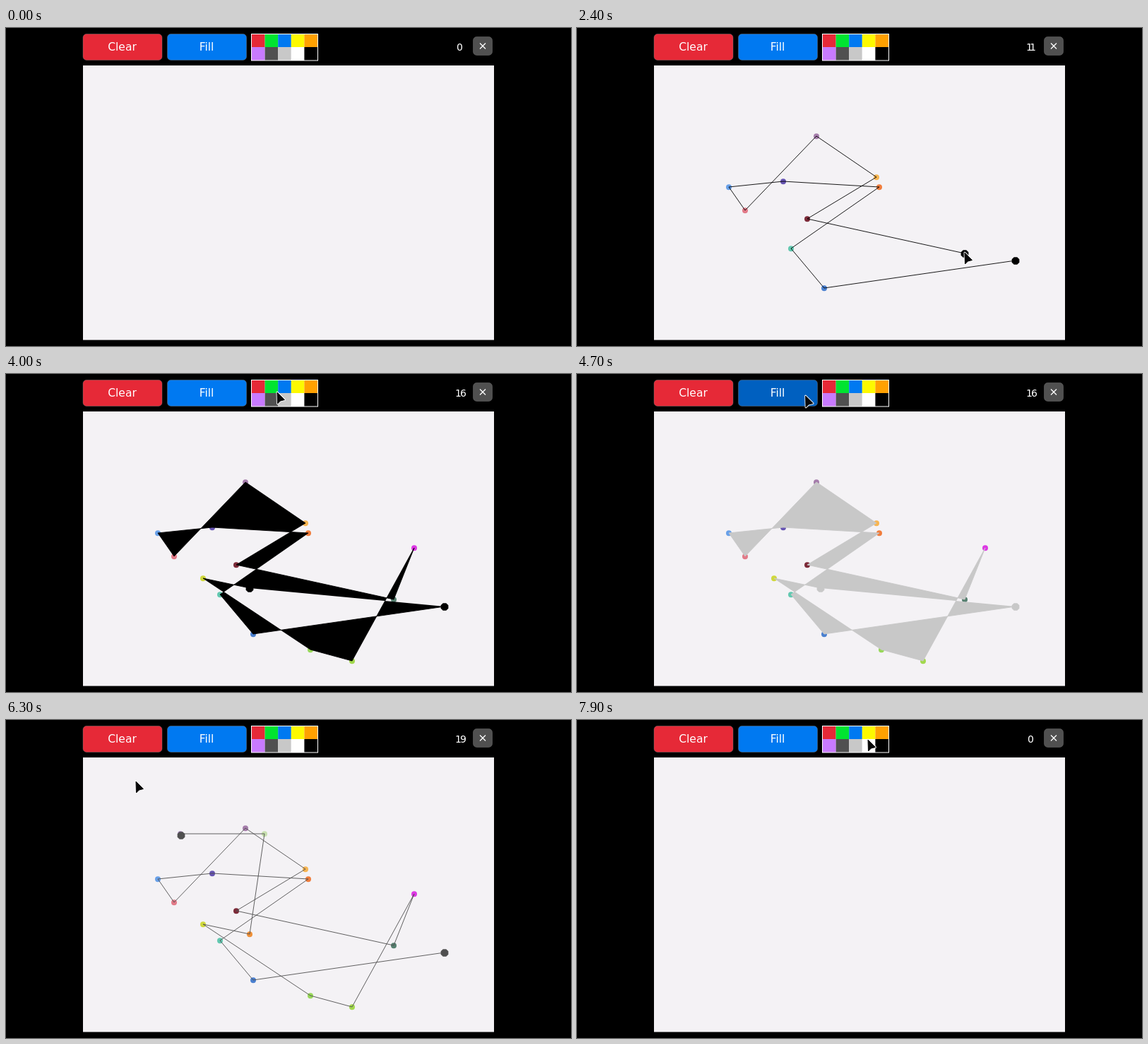
These frames come from a looping animation (800 px wide and 450 px high, 8000 ms). An HTML page with a canvas:

```html
<!DOCTYPE html>
<html lang="en">
<head>
<meta charset="utf-8">
<style>
html, body { margin: 0; width: 100%; height: 100%; overflow: hidden; background: #000; }
canvas { display: block; }
</style>
</head>
<body>
<canvas id="stage" width="800" height="450"></canvas>
<script>
const ctx = document.getElementById('stage').getContext('2d');
const LOOP = 8000, STEP = 100, CLEAR_AT = 7400;
const RED = '#e62937', BLUE = '#0079f1', DARK = '#505050', LIGHT = '#c8c8c8';
const PALETTE = [RED, '#00e430', BLUE, '#fdf900', '#ffa100', '#c87aff', DARK, LIGHT, '#fff', '#000'];

// Clicked vertices: time, x, y, colour once another vertex follows
const VERTICES = [
  [100, 621, 329, '#000'], [500, 350, 368, '#4a80d0'], [700, 303, 312, '#62c8b0'],
  [900, 428, 225, '#f07d3c'], [1100, 292, 217, '#6654b2'], [1300, 215, 225, '#68a0e8'],
  [1500, 238, 258, '#e27a88'], [1700, 339, 153, '#a57dab'], [1900, 424, 211, '#f7b552'],
  [2100, 326, 270, '#7c2a38'], [2300, 549, 319, '#568070'], [2500, 578, 246, '#dd38e4'],
  [2700, 490, 406, '#a2d84e'], [2800, 431, 390, '#98d85a'], [3000, 279, 289, '#cfd83c'],
  [3200, 345, 303, '#ee9038'], [5800, 366, 161, '#c8e0b0'], [6000, 247, 161, '#9a80b0'],
  [6100, 248, 163, '#70a098'], [6400, 179, 87, '#000']
];

// Pointer stops on the toolbar and pauses between clicks
const STOPS = [
  [200, 430, 349], [300, 430, 349], [2400, 549, 318], [3500, 292, 31], [3700, 292, 31],
  [4000, 384, 26], [4200, 391, 34], [4500, 391, 34], [4800, 300, 30], [4900, 298, 30],
  [5300, 379, 31], [5400, 377, 30], [5500, 377, 30], [6300, 184, 87], [6900, 296, 30],
  [7100, 298, 30], [7300, 170, 30], [7400, 168, 29], [7900, 412, 28]
];
const PATH = [...VERTICES, ...STOPS].sort((a, b) => a[0] - b[0]);
const COLORS = [[0, '#000'], [4200, LIGHT], [5300, DARK]];
const FILLS = [[0, false], [3500, true], [4900, false], [6900, true], [CLEAR_AT, false]];

const valueAt = (changes, t) => changes.filter(c => c[0] <= t).pop()[1];

function pointerAt(t) {
  const i = PATH.findIndex(p => p[0] >= t);
  if (i < 1) return PATH[0].slice(1, 3);
  const [t0, x0, y0] = PATH[i - 1], [t1, x1, y1] = PATH[i];
  const u = (t - t0) / (t1 - t0), ease = u * u * (3 - 2 * u);
  return [x0 + (x1 - x0) * ease, y0 + (y1 - y0) * ease];
}

function rect(color, x, y, w, h) {
  ctx.fillStyle = color;
  ctx.fillRect(x, y, w, h);
}

function roundBox(x, y, w, h, color) {
  ctx.beginPath();
  ctx.roundRect(x + .5, y + .5, w - 1, h - 1, 5);
  ctx.fillStyle = color;
  ctx.fill();
  ctx.lineWidth = 1;
  ctx.strokeStyle = 'rgba(130,130,130,.4)';
  ctx.stroke();
}

function button(label, x, color, hoverColor, pointer) {
  const hover = pointer && pointer[0] > x && pointer[0] < x + 113 && pointer[1] > 8 && pointer[1] < 46;
  roundBox(x, 8, 113, 38, hover ? hoverColor : color);
  ctx.fillStyle = '#fff';
  ctx.font = '15.5px "DejaVu Sans", sans-serif';
  ctx.textAlign = 'center';
  ctx.fillText(label, x + 56, 32);
}

function counter(count) {
  ctx.font = '14px "DejaVu Sans", sans-serif';
  ctx.textAlign = 'center';
  ctx.fillStyle = '#fff';
  let x = 638;
  for (const digit of String(count)) {
    const width = digit === '1' ? 5 : 9;
    ctx.fillText(digit, x + width / 2, 31.5);
    x += width;
  }
}

function toolbar(count, pointer) {
  button('Clear', 108.5, RED, '#b8202c', pointer);
  button('Fill', 228, BLUE, '#0060c0', pointer);
  rect('#fff', 347, 8, 95, 38.5);
  PALETTE.forEach((color, i) =>
    rect(color, 348 + i % 5 * 18.6, i < 5 ? 9 : 27, 18.6, i < 5 ? 18 : 18.5));
  counter(count);
  roundBox(661, 12, 28, 27, DARK);
  ctx.beginPath();
  ctx.moveTo(671, 21.5); ctx.lineTo(679, 29.5);
  ctx.moveTo(679, 21.5); ctx.lineTo(671, 29.5);
  ctx.lineWidth = 1.3;
  ctx.strokeStyle = '#fff';
  ctx.stroke();
}

function endDot(x, y) {
  ctx.beginPath();
  for (let i = 0; i < 8; i++) {
    const a = (i + .5) * Math.PI / 4;
    ctx.lineTo(x + 5.8 * Math.cos(a), y + .5 + 5.8 * Math.sin(a));
  }
  ctx.fill();
}

function polygon(points, color, filled) {
  points.forEach(([, x, y, dotColor], i) => {
    const isEnd = i === 0 || i === points.length - 1;
    ctx.fillStyle = isEnd ? color : dotColor;
    if (isEnd) return endDot(x, y);
    ctx.beginPath();
    ctx.arc(x, y + .3, 4, 0, 2 * Math.PI);
    ctx.fill();
  });
  ctx.beginPath();
  points.forEach(([, x, y]) => ctx.lineTo(x, y));
  ctx.lineWidth = .9;
  ctx.strokeStyle = ctx.fillStyle = color;
  ctx.stroke();
  if (filled) ctx.fill('evenodd');
}

function arrow([x, y]) {
  ctx.save();
  ctx.translate(x, y);
  ctx.beginPath();
  [[0, 0], [.5, 16], [4.5, 12], [10.5, 10.5]].forEach(p => ctx.lineTo(...p));
  ctx.closePath();
  ctx.lineJoin = 'round';
  ctx.lineWidth = 3;
  ctx.strokeStyle = 'rgba(255,255,255,.85)';
  ctx.stroke();
  ctx.lineWidth = 1;
  ctx.fillStyle = ctx.strokeStyle = '#080808';
  ctx.fill();
  ctx.stroke();
  ctx.restore();
}

function draw(now) {
  const t = Math.floor(now % LOOP / STEP) * STEP;
  const points = t < CLEAR_AT ? VERTICES.filter(v => v[0] <= t) : [];
  const pointer = t >= 100 ? pointerAt(t) : null;
  rect('#000', 0, 0, 800, 450);
  rect('#f4f2f5', 109, 53, 582, 388.5);
  toolbar(points.length, pointer);
  polygon(points, valueAt(COLORS, t), valueAt(FILLS, t));
  if (pointer) arrow(pointer);
}

const start = performance.now();
function tick() {
  draw(performance.now() - start);
  requestAnimationFrame(tick);
}
tick();
</script>
</body>
</html>
```
